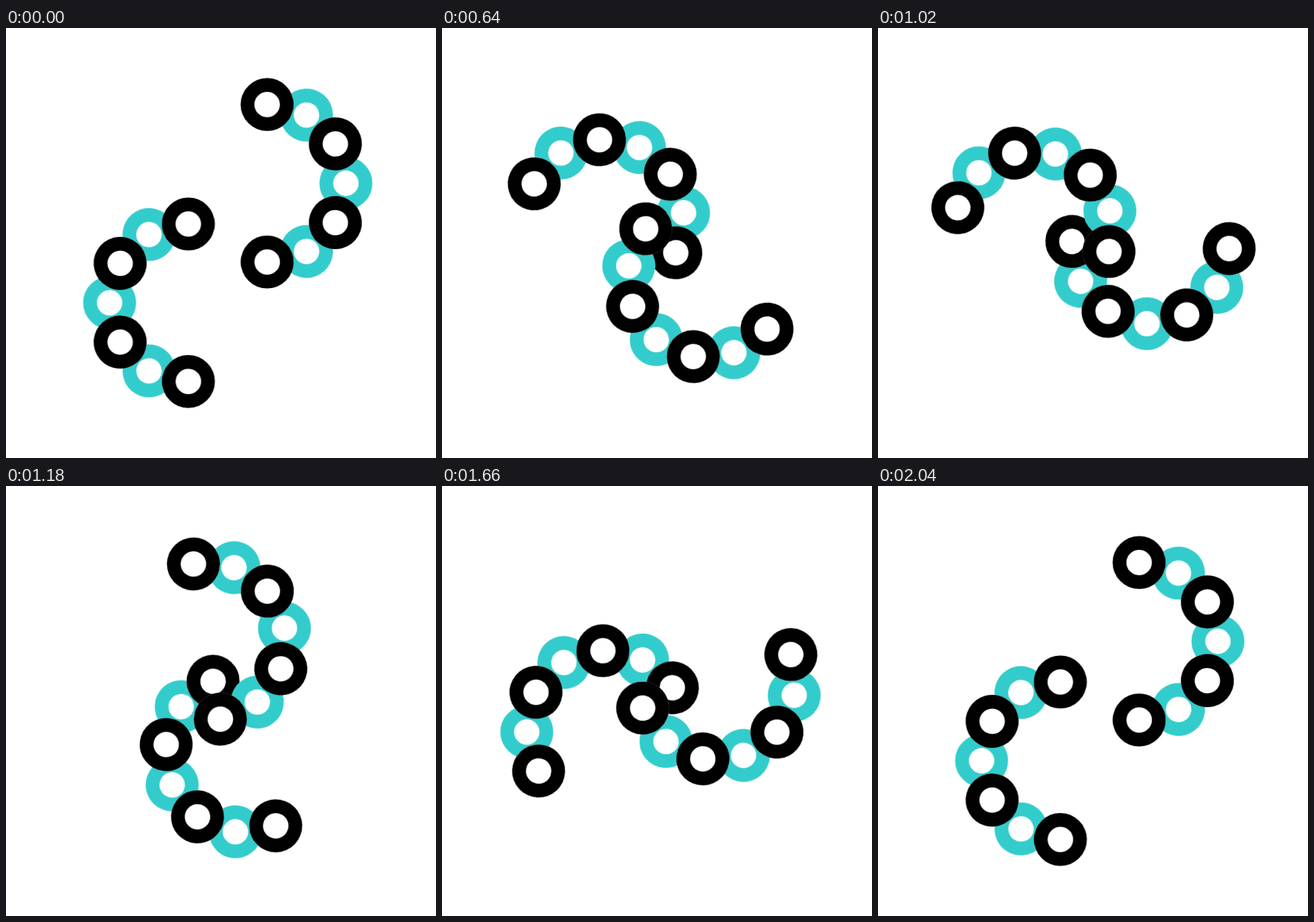
An HTML page for the animation above (2200 ms loop, 640 px wide and 640 px high).

```html
<!DOCTYPE html>
<html lang="en">
<head>
<meta charset="utf-8">
<title>Ring chains</title>
<style>
  html, body { margin: 0; width: 100%; height: 100%; overflow: hidden; background: #fff; }
  svg { display: block; width: 100vw; height: 100vh; }

  .pair, .arm { animation: 2200ms linear infinite; }
  .pair { transform-origin: 320px 320px; animation-name: spin; }
  .arm { animation-name: fold; }
  .upper { transform-origin: 359.3px 233.8px; --fold: 46.2deg; }
  .lower { transform-origin: 300.8px 406.2px; --fold: 32.6deg; }

  .dark { color: #000; }
  .teal { color: #33cccc; }

  /* each chain folds inwards, stays folded, then opens again */
  @keyframes fold {
    0% { transform: rotate(0deg); animation-timing-function: cubic-bezier(.333, 0, .667, 1); }
    21.818% { transform: rotate(var(--fold)); }
    70.909% { transform: rotate(var(--fold)); animation-timing-function: cubic-bezier(.333, 0, .667, 1); }
    92.727%, 100% { transform: rotate(0deg); }
  }

  /* one turn of the pair that overshoots and settles back */
  @keyframes spin {
    0% { transform: rotate(0deg); }
    13.409% { transform: rotate(0deg); animation-timing-function: cubic-bezier(.333, 0, .667, .473); }
    24.545% { transform: rotate(47.6deg); animation-timing-function: cubic-bezier(.333, .291, .667, .638); }
    29.091% { transform: rotate(83deg); animation-timing-function: cubic-bezier(.333, .311, .667, .664); }
    46.364% { transform: rotate(239.6deg); animation-timing-function: cubic-bezier(.333, .369, .667, .72); }
    60.909% { transform: rotate(359.6deg); animation-timing-function: cubic-bezier(.333, .45, .667, 1); }
    69.091% { transform: rotate(402deg); animation-timing-function: cubic-bezier(.333, 0, .667, .385); }
    73.636% { transform: rotate(395.5deg); animation-timing-function: cubic-bezier(.333, .258, .667, .677); }
    75.455% { transform: rotate(389.4deg); animation-timing-function: cubic-bezier(.333, .648, .667, 1); }
    92.727%, 100% { transform: rotate(360deg); }
  }
</style>
</head>
<body>
<svg viewBox="0 0 640 640">
  <defs>
    <g id="ring">
      <circle cx="117.2" r="39.4" fill="#fff"/>
      <circle cx="117.2" r="29.15" fill="none" stroke="currentColor" stroke-width="20.5"/>
    </g>
    <g id="chain" transform="translate(388.7 231.1)">
      <g class="teal">
        <use href="#ring" transform="rotate(-60)"/>
        <use href="#ring"/>
        <use href="#ring" transform="rotate(60)"/>
      </g>
      <g class="dark">
        <use href="#ring" transform="rotate(-90)"/>
        <use href="#ring" transform="rotate(-30)"/>
        <use href="#ring" transform="rotate(30)"/>
        <use href="#ring" transform="rotate(90)"/>
      </g>
    </g>
  </defs>
  <g class="pair">
    <g class="arm lower"><use href="#chain" transform="rotate(180 330.05 320)"/></g>
    <g class="arm upper"><use href="#chain"/></g>
  </g>
</svg>
</body>
</html>
```
